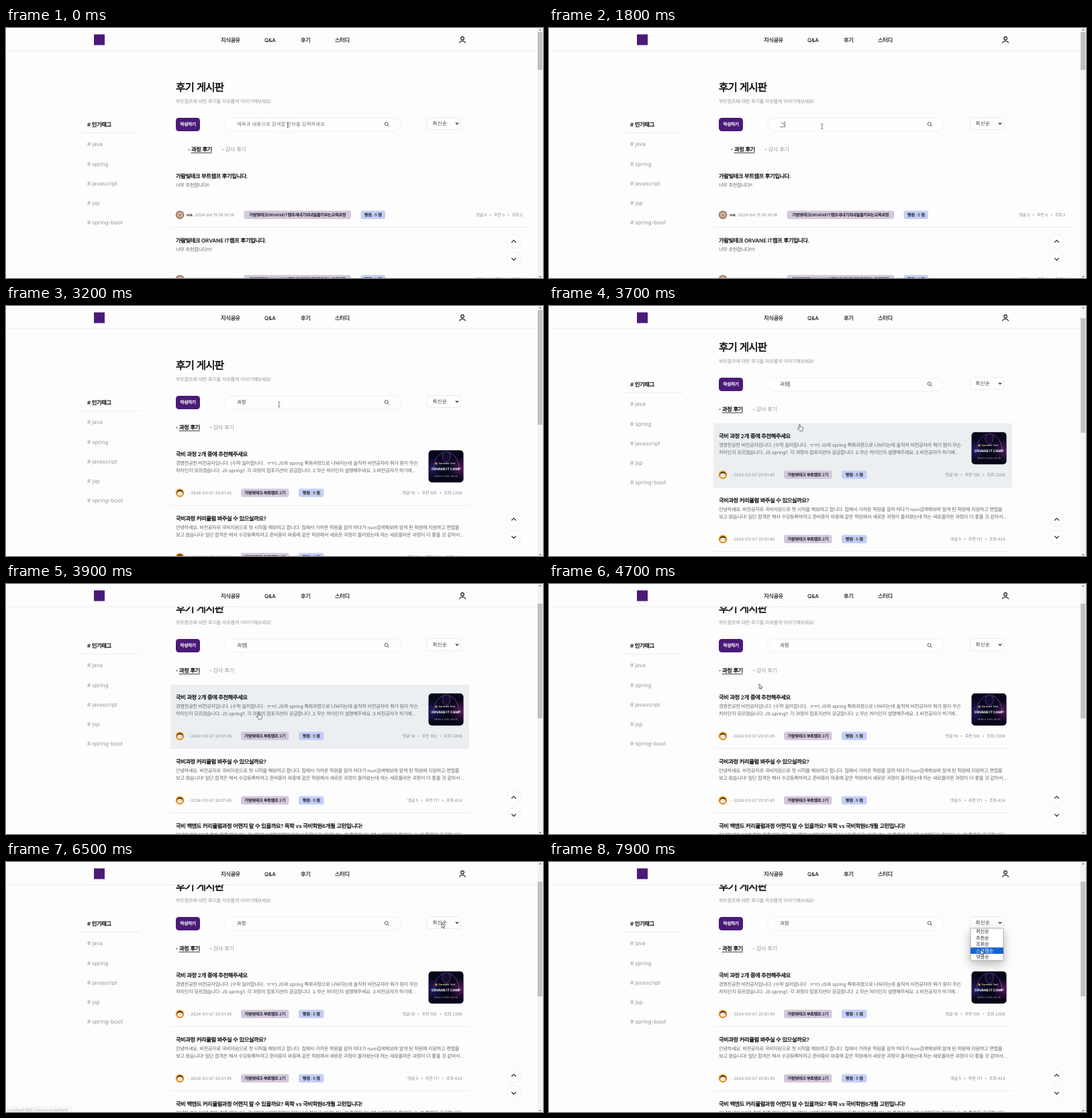
Write an HTML page with a canvas that moves like this. It is 800x373 px and loops after 8000 ms.

```html
<!DOCTYPE html>
<html lang="ko">
<head>
<meta charset="utf-8">
<title>후기 게시판</title>
<style>
html, body { margin: 0; width: 100%; height: 100%; overflow: hidden; background: #fdfdfe; }
canvas { display: block; width: 100vw; height: 100vh; }
</style>
</head>
<body>
<canvas id="stage" width="800" height="373"></canvas>
<script>
const ctx = document.getElementById('stage').getContext('2d');
const LOOP = 8000, W = 800, H = 373;
const BG = '#fdfdfe', INK = '#111', GREY = '#999', PURPLE = '#4b1a78', LINE = '#ececef';
const LIST_TOP = 202, ITEM_H = 96, OPTION_H = 9.5, MENU_TOP = 99;
const LATIN_SCALE = .955;
const OPTIONS = ['최신순', '추천순', '조회순', '스크랩순', '댓글순'];
const TYPED = ['ㄱ', '고', '과', '과저', '과정'];

// pointer: time, x, y
const PATH = [
  [0, 420, 145], [400, 407, 147], [3500, 407, 147], [3700, 373.5, 177],
  [4000, 378, 200], [4400, 335, 165], [4700, 313, 149], [5000, 296, 185],
  [5300, 236, 205], [5700, 290, 275], [6100, 540, 215], [6300, 615, 140],
  [6500, 649, 91], [7300, 649, 91], [7700, 645, 122], [7800, 645, 122], [7900, 643, 131]
];

const LONG_TAG = '가람빛테크ORVANEIT캠프새내기의내일을키우는교육과정';
const SHORT_TAG = '가람빛테크 부트캠프 2기';
const FIRST_LIST = [
  { title: '가람빛테크 부트캠프 후기입니다.', body: ['너무 추천합니다!!'], stats: [0, 0, 2] },
  { title: '가람빛테크 ORVANE IT캠프 후기입니다.', body: ['너무 추천합니다!!!!'], stats: [0, 0, 1] }
];
const FOUND_LIST = [
  { title: '국비 과정 2개 중에 추천해주세요', banner: true, stats: [19, 100, 2208], body: [
    '경영전공한 비전공자입니다. (수학 싫어합니다.. ㅠㅠ) JS와 spring 특화과정으로 나눠지는데 솔직히 비전공자라 뭐가 뭔지 무슨',
    '차이인지 모르겠습니다. JS spring1. 각 과정의 잡포지션이 궁금합니다. 2.무슨 차이인지 설명해주세요. 3.비전공자가 하기에...'] },
  { title: '국비과정 커리큘럼 봐주실 수 있으실까요?', stats: [5, 171, 424], body: [
    '안녕하세요. 비전공자로 국비지원으로 첫 시작을 해보려고 합니다. 집에서 가까운 학원을 갈까 하다가 nuvi검색해보며 알게 된 학원에 지원하고 면접을',
    '보고 왔습니다! 일단 합격은 해서 수강등록하려고 준비중이 와중에 같은 학원에서 새로운 과정이 올라왔는데 저는 새로올라온 과정이 더 좋을 것 같아서....'] },
  { title: '국비 백엔드 커리큘럼과정 어떤지 알 수 있을까요? 독학 vs 국비학원6개월 고민입니다!', stats: [3, 96, 310], body: [
    '안녕하세요 20대 후반 취준생입니다. 국비학원 6개월과정이 있어서 독학으로 \'이걸\' 하는게 좋을지 아니면 6개월동안 학원다니는게 좋을지 궁금합니다!'] }
];

function runs(s, size, weight, ls, family, each) {
  for (const part of s.match(/[ㄱ-ㅣ가-힣]+|[^ㄱ-ㅣ가-힣]+/g)) {
    const hangul = /[ㄱ-ㅣ가-힣]/.test(part);
    ctx.font = hangul
      ? `400 ${size}px "Noto Sans CJK KR", sans-serif`
      : `${weight} ${size * LATIN_SCALE}px ${family}, sans-serif`;
    ctx.letterSpacing = (hangul ? ls * size : 0) + 'px';
    ctx.wordSpacing = -.035 * size + 'px';
    each(part, ctx.measureText(part).width, hangul);
  }
}

// cy is the middle of the glyphs; align is 0 left, .5 centre, 1 right
function text(s, x, cy, size, color, weight = 400, align = 0, ls = -.055, family = 'Inter') {
  const y = cy + size * .37;
  let width = 0;
  runs(s, size, weight, ls, family, (p, w) => width += w);
  x -= width * align;
  ctx.fillStyle = ctx.strokeStyle = color;
  // an outline gives Hangul the weights between regular and bold
  ctx.lineWidth = (weight - 400) / 200 * .042 * size;
  runs(s, size, weight, ls, family, (p, w, hangul) => {
    ctx.fillText(p, x, y);
    if (hangul && weight > 400) ctx.strokeText(p, x, y);
    x += w;
  });
  return width;
}

function rect(x, y, w, h, color) {
  ctx.fillStyle = color;
  ctx.fillRect(x, y, w, h);
}

function box(x, y, w, h, r, fill, stroke, lw = 1) {
  ctx.beginPath();
  ctx.roundRect(x, y, w, h, r);
  paint(fill, stroke, lw);
}

function disc(x, y, r, fill, stroke, lw = 1) {
  ctx.beginPath();
  ctx.arc(x, y, r, 0, Math.PI * 2);
  paint(fill, stroke, lw);
}

function paint(fill, stroke, lw) {
  if (fill) { ctx.fillStyle = fill; ctx.fill(); }
  if (stroke) { ctx.strokeStyle = stroke; ctx.lineWidth = lw; ctx.stroke(); }
}

function poly(points, fill, stroke, lw, closed) {
  ctx.beginPath();
  points.forEach(([x, y]) => ctx.lineTo(x, y));
  if (closed) ctx.closePath();
  paint(fill, stroke, lw);
}

function chevron(x, y, w, h, lw) {
  poly([[x - w, y - h], [x, y + h], [x + w, y - h]], null, '#222', lw);
}

function pointerAt(t) {
  for (let i = 1; i < PATH.length; i++) {
    const [t0, x0, y0] = PATH[i - 1], [t1, x1, y1] = PATH[i];
    if (t <= t1) {
      const k = (t - t0) / (t1 - t0);
      return [x0 + (x1 - x0) * k, y0 + (y1 - y0) * k];
    }
  }
  return PATH[PATH.length - 1].slice(1);
}

function scrollAt(t) {
  const k = Math.min(1, Math.max(0, (t - 3500) / 390));
  return Math.round(52 * k * k * (3 - 2 * k));
}

function caretOn(t) {
  return (t >= 800 && t < 1300) || (t >= 1800 && t < 3200) || (t >= 3700 && t < 4200);
}

function drawSidebar() {
  text('# 인기태그', 121, 144, 8.33, INK, 600);
  rect(113, 156, 87, .8, LINE);
  ['java', 'spring', 'javascript', 'jsp', 'spring-boot'].forEach((tag, i) =>
    text('# ' + tag, 121, 173.3 + i * 29.1, 8.6, GREY));
}

function drawSearch(t) {
  box(253, 134, 36, 20, 4.5, PURPLE);
  text('작성하기', 271, 143.5, 6.77, '#fff', 600, .5);

  box(325.5, 134, 263, 20, 10, '#fefefe', '#ececef', .8);
  let end = 344;
  if (t < 1800) {
    text('제목과 내용으로 검색할 단어를 입력하세요.', 344, 143.3, 7.29, '#777', 400, 0, .02);
  } else {
    const s = TYPED[Math.min(4, Math.floor((t - 1800) / 100))];
    const w = text(s, 344, 143.5, 7.29, '#333', 400, 0, 0);
    end += w;
    if (t < 2600) rect(end - w / s.length, 147.4, w / s.length, .6, '#333');
  }
  if (caretOn(t)) rect(end + .2, 139.5, .7, 8.5, '#222');

  disc(566.6, 143, 2.5, null, '#333', .8);
  poly([[568.4, 144.8], [570.4, 146.8]], null, '#333', .9);

  box(627.5, 133.5, 50, 18, 3, '#fefefe', '#e8e8ec', .8);
  text('최신순', 635.5, 142.4, 7.29, '#333', 400, 0, .08);
  chevron(672, 142.6, 2, 1.1, 1.2);
}

function drawTabs(x) {
  disc(x + 1.5, 181.3, 1.1, '#a5623c');
  const w = text('과정 후기', x + 5, 181, 8.33, INK, 600);
  rect(x + 4.5, 185.8, w + .5, .8, INK);
  disc(x + 52, 181.3, 1, '#aaa');
  text('강사 후기', x + 55.5, 181, 8.33, GREY);
}

function glow(x, y, r, rgb) {
  const g = ctx.createRadialGradient(x, y, 0, x, y, r);
  g.addColorStop(0, `rgba(${rgb},.6)`);
  g.addColorStop(1, `rgba(${rgb},0)`);
  rect(629, 215, 53, 48, g);
}

function drawBanner() {
  ctx.save();
  ctx.beginPath();
  ctx.roundRect(629.5, 215.3, 52, 48, 5);
  ctx.clip();
  rect(629, 215, 53, 49, '#08061a');
  glow(634, 242, 17, '50,48,150');
  glow(678, 242, 17, '130,40,130');
  const rim = ctx.createLinearGradient(635, 0, 677, 0);
  rim.addColorStop(0, '#4446b8');
  rim.addColorStop(1, '#a04aa8');
  ctx.beginPath();
  ctx.ellipse(656, 243, 19, 25, 0, Math.PI, 0);
  paint(null, rim, .8);
  ctx.beginPath();
  ctx.ellipse(656, 225, 6, 8, 0, 0, Math.PI * 2);
  paint('#150d30', '#70458c', .7);
  disc(641, 235, 1.8, '#f08030');
  text('Garambit Tech', 644.5, 235, 3.8, '#eee', 500);
  text('ORVANE IT CAMP', 655.5, 243, 5.3, '#fff', 700, .5);
  text('함께 배우고 성장하는 개발 여정', 655.5, 254, 2.8, '#bbb', 400, .5);
  ctx.restore();
}

function drawAvatar(y, found) {
  disc(259, y, 6.4, found ? '#f5a32a' : '#a98674');
  if (!found) {
    disc(259, y, 4.7, '#dcb892', '#80645c', .7);
    disc(259, y + .8, 2, '#b98270');
    return;
  }
  disc(259, y, 4.6, '#4a2c20');
  ctx.beginPath();
  ctx.ellipse(259, y + 1, 3.9, 3.3, 0, 0, Math.PI * 2);
  paint('#fff0dc');
  disc(257.5, y + .7, .4, '#333');
  disc(260.5, y + .7, .4, '#333');
}

function pill(s, x, y, w, color) {
  box(x, y - 6.3, w, 12.6, 3, color);
  text(s, x + w / 2, y - .2, 6.25, '#2a2a2e', 600, .5);
}

function drawStats(stats, right, y) {
  const parts = ['댓글', '추천', '조회'].map((name, i) => `${name} ${stats[i]}`).reverse();
  parts.forEach((s, i) => {
    right -= text(s, right, y - .2, 6.25, '#888', 400, 1);
    if (i < 2) disc(right - 5, y, .9, '#999');
    right -= 10.5;
  });
}

function drawItem(item, i, found, hover, bannerReady) {
  const y = LIST_TOP + i * ITEM_H, meta = y + 76.8, right = found ? 690 : 780;
  if (hover) rect(245, y, right - 245, ITEM_H - .5, '#eceff1');
  text(item.title, 253, y + 18.5, 8.33, INK, 600);
  item.body.forEach((line, n) => text(line, 253, y + 32.3 + n * 11.3, 7.29, '#666'));
  if (item.banner && bannerReady) drawBanner();
  drawAvatar(meta, found);
  if (found) {
    text('- 2024-03-07 20:01:45', 271, meta - .3, 6.3, '#888');
    pill(SHORT_TAG, 350, meta, 71.5, '#d3c8dd');
    pill('평점 : 5 점', 436, meta, 37.5, '#c3cff6');
  } else {
    text('mk', 269, meta - .3, 6.3, '#222', 600);
    text('- 2024-04-15 14:30:16', 277, meta - .3, 6.3, '#888');
    pill(LONG_TAG, 354.5, meta, 159.5, '#d3c8dd');
    pill('평점 : 5 점', 528.5, meta, 36.5, '#c3cff6');
  }
  drawStats(item.stats, right - 10.5, meta);
  rect(245, y + ITEM_H - 1, right - 245, .8, LINE);
}

function drawHeader() {
  rect(0, 0, 792, 33.5, BG);
  rect(4, 33.3, 788, 1, LINE);
  rect(131, 9.5, 16, 16, PURPLE);
  [['지식공유', 320], ['Q&A', 385], ['후기', 439], ['스터디', 490]].forEach(([s, x]) =>
    text(s, x, 17.8, 8.33, INK, 500));
  disc(680, 15.4, 2.3, null, INK, 1.1);
  ctx.beginPath();
  ctx.moveTo(675.6, 22.6);
  ctx.bezierCurveTo(676, 18.4, 684, 18.4, 684.4, 22.6);
  paint(null, INK, 1.1);
}

function drawFloating() {
  for (const [y, dir] of [[318.3, -1], [344.8, 1]]) {
    disc(756.4, y, 10.8, '#fefefe', '#ececef', .8);
    chevron(756.4, y, 3.3, 1.7 * dir, 1.1);
  }
}

function drawScrollbar(scroll, found) {
  rect(791.5, 0, 8.5, H, '#f3f3f3');
  rect(792, 6 + scroll * .45, 7.2, found ? 171 : 56.5, '#c1c1c1');
  poly([[793.8, 3.4], [795.8, 1.2], [797.8, 3.4]], '#777', null, 0, true);
  poly([[793.8, 370], [795.8, 372.2], [797.8, 370]], '#777', null, 0, true);
}

function drawMenu(pointerY) {
  const active = Math.max(0, Math.min(4, Math.floor((pointerY - MENU_TOP) / OPTION_H)));
  ctx.save();
  ctx.shadowColor = 'rgba(0,0,0,.3)';
  ctx.shadowBlur = 16;
  ctx.shadowOffsetY = 5;
  box(628, MENU_TOP, 49, 48, 1.5, '#fff');
  ctx.restore();
  rect(628, MENU_TOP + active * OPTION_H, 49, OPTION_H, '#1a62d2');
  OPTIONS.forEach((s, i) =>
    text(s, 636, MENU_TOP + 4.8 + i * OPTION_H, 7.2, i === active ? '#fff' : '#222', 400, 0, -.01));
  box(628, MENU_TOP, 49, 48, 1.5, null, '#808080', .6);
}

function drawStatus(t) {
  if (t < 5000 || t >= 6800) return;
  ctx.globalAlpha = t < 6400 ? 1 : (6800 - t) / 700;
  box(-1, 365, 99, 9, 1.5, '#eef0f3', '#d5d7da', .5);
  text('localhost:8081/review/undefined', 2, 369.5, 6.4, '#666', 400, 0, 0, 'Roboto');
  ctx.globalAlpha = 1;
}

function drawPointer(kind, x, y) {
  ctx.save();
  ctx.translate(x, y);
  if (kind === 'beam') {
    rect(-.5, -4, .7, 8, '#444');
    rect(-1.8, -4.1, 3.3, .6, '#555');
    rect(-1.8, 3.5, 3.3, .6, '#555');
  } else if (kind === 'hand') {
    poly([[-.8, 0], [.6, 0], [.9, 3.2], [4.6, 4], [5.2, 5], [4.8, 7.4], [4, 9.4],
      [0, 9.4], [-3, 5.8], [-2.6, 4.8], [-.9, 5.8]], '#fff', '#333', .7, true);
  } else {
    poly([[0, 0], [0, 7.2], [1.6, 5.8], [2.7, 8.2], [3.8, 7.7], [2.8, 5.4], [5, 5.2]],
      '#fff', '#333', .7, true);
  }
  ctx.restore();
}

function draw(t) {
  const scroll = scrollAt(t), [px, py] = pointerAt(t);
  const found = t >= 2600;
  const row = Math.floor((py + scroll - LIST_TOP) / ITEM_H);
  const hovered = found && px >= 245 && px <= 690 && row >= 0 ? row : -1;

  rect(0, 0, W, H, BG);
  ctx.save();
  ctx.translate(0, -scroll);
  text('후기 게시판', 253, 88, 15.6, INK, 600);
  text('부트캠프에 대한 후기를 자유롭게 이야기해보세요!', 253, 109, 7.29, GREY);
  drawSidebar();
  drawSearch(t);
  drawTabs(found ? 253 : 271);
  (found ? FOUND_LIST : FIRST_LIST).forEach((item, i) =>
    drawItem(item, i, found, i === hovered, t >= 2700));
  ctx.restore();

  drawHeader();
  drawFloating();
  drawScrollbar(scroll, found);
  if (t >= 6700) drawMenu(py);
  drawStatus(t);
  drawPointer(t < 3600 ? 'beam' : hovered >= 0 ? 'hand' : 'arrow', px, py);
}

function tick(now) {
  draw(Math.floor((now % LOOP) / 100) * 100);
  requestAnimationFrame(tick);
}
ctx.textRendering = 'geometricPrecision';
ctx.lineJoin = 'round';
requestAnimationFrame(tick);
</script>
</body>
</html>
```
